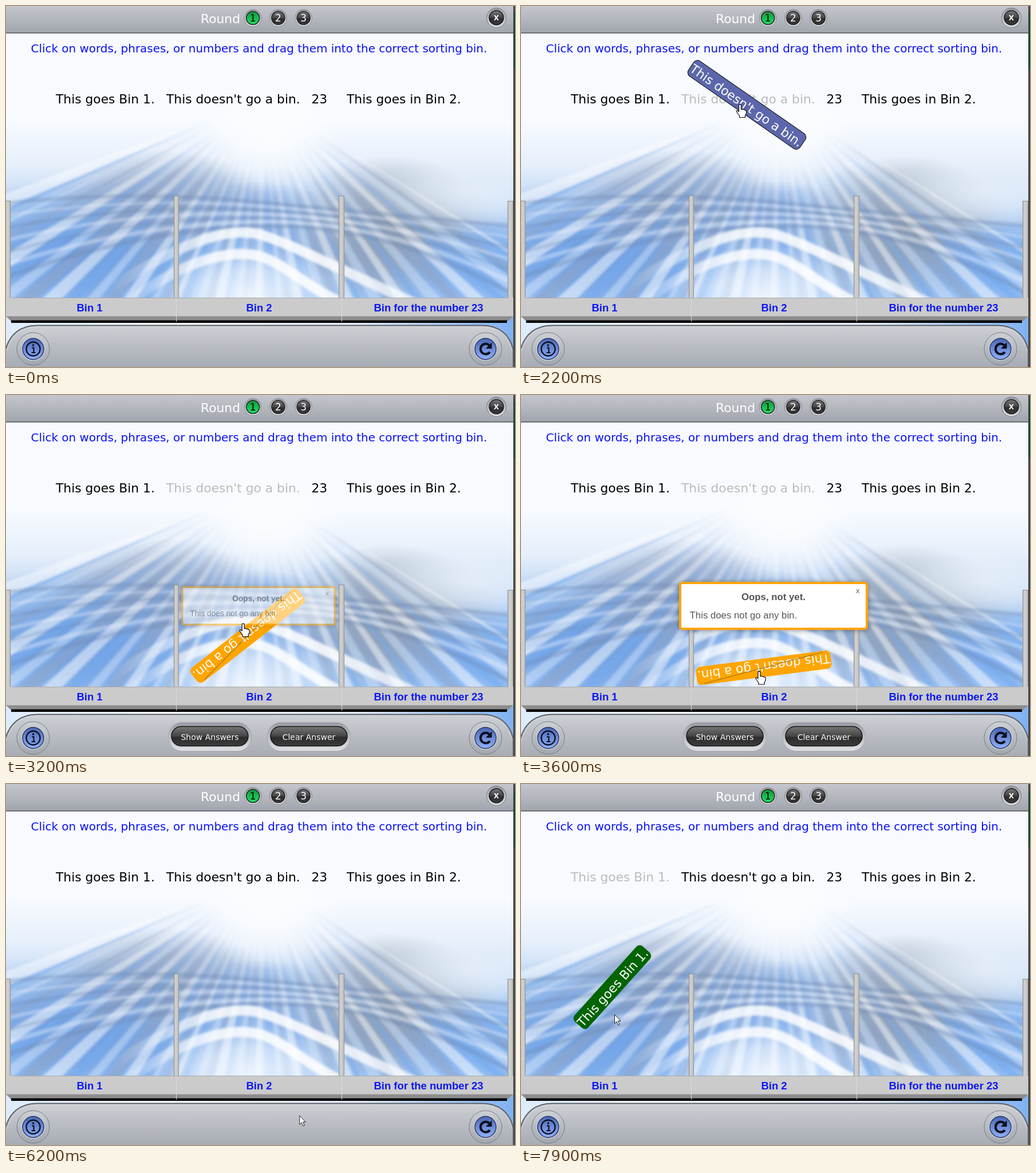
An HTML page with a canvas that plays this animation: 889 px wide and 630 px high, repeating every 8 s.

```html
<!DOCTYPE html>
<html lang="en">
<head>
<meta charset="utf-8">
<title>Sorting bins</title>
<style>
  html, body { margin: 0; width: 100%; height: 100%; overflow: hidden; background: #f8faff; }
  canvas, svg { position: absolute; left: 0; top: 0; width: 889px; height: 630px; }
  text { font-family: "DejaVu Sans", Verdana, sans-serif; white-space: pre; }
  .word { font-size: 21.8px; }
  .label { font: bold 18.5px "Liberation Sans", Arial, sans-serif; fill: #0c18f4; text-anchor: middle; }
  .note { font: 16.8px "Liberation Sans", Arial, sans-serif; fill: #555; }
  .mid { text-anchor: middle; }
</style>
</head>
<body>
<canvas id="bg" width="889" height="630"></canvas>
<svg id="stage" viewBox="0 0 889 630">
  <defs>
    <linearGradient id="bar" x2="0" y2="1">
      <stop offset="0" stop-color="#c3c6cc"/><stop offset=".5" stop-color="#b3b6bd"/><stop offset="1" stop-color="#a0a4ac"/>
    </linearGradient>
    <linearGradient id="panel" x2="0" y2="1">
      <stop offset="0" stop-color="#cdd0d5"/><stop offset=".45" stop-color="#b9bcc3"/><stop offset="1" stop-color="#a3a7af"/>
    </linearGradient>
    <linearGradient id="ring" x2="0" y2="1">
      <stop offset="0" stop-color="#989ba2"/><stop offset="1" stop-color="#dfe1e5"/>
    </linearGradient>
    <linearGradient id="dark" x2="0" y2="1">
      <stop offset="0" stop-color="#777"/><stop offset=".5" stop-color="#444"/><stop offset=".55" stop-color="#2c2c2c"/><stop offset="1" stop-color="#3c3c3c"/>
    </linearGradient>
    <linearGradient id="green" x2="0" y2="1">
      <stop offset="0" stop-color="#0b9a3a"/><stop offset="1" stop-color="#25dc66"/>
    </linearGradient>
    <linearGradient id="blue" x2="0" y2="1">
      <stop offset="0" stop-color="#4a66b4"/><stop offset="1" stop-color="#8fb0fa"/>
    </linearGradient>
    <linearGradient id="wall">
      <stop offset="0" stop-color="#bdbdbd"/><stop offset=".4" stop-color="#d2d2d2"/><stop offset="1" stop-color="#bcbcbc"/>
    </linearGradient>
    <linearGradient id="gap">
      <stop offset="0" stop-color="#dcebfc"/><stop offset=".3" stop-color="#f4f8fd"/><stop offset=".7" stop-color="#e3ebf6"/><stop offset="1" stop-color="#7fb1f1"/>
    </linearGradient>
    <filter id="shade" x="-10%" y="-25%" width="120%" height="150%">
      <feDropShadow dx="0" dy="1" stdDeviation="4" flood-opacity=".4"/>
    </filter>
  </defs>

  <rect x="886" width="3" height="630" fill="#41474b"/>
  <rect x="887" y="12" width="2" height="98" fill="#0c4a2a"/>

  <rect width="886" height="47" fill="url(#bar)"/>
  <rect y="46" width="886" height="2" fill="#6c7078"/>
  <text class="word" x="340" y="29.500" fill="#fff">Round</text>
  <g id="rounds"></g>
  <circle cx="856.500" cy="20.500" r="17" fill="url(#ring)" stroke="#777b82"/>
  <circle cx="856.500" cy="20.500" r="12.500" fill="url(#dark)" stroke="#1c1c1c" stroke-width="1.500"/>
  <text class="mid" x="856.500" y="25" font-size="12" font-weight="bold" fill="#fff">X</text>

  <text x="43.500" y="81" font-size="19.950" fill="#0b12f2">Click on words, phrases, or numbers and drag them into the correct sorting bin.</text>

  <g id="words"></g>

  <g stroke="#929292" fill="url(#wall)">
    <rect x="-.5" y="340.500" width="8" height="170"/>
    <rect x="293.500" y="331.500" width="8" height="178"/>
    <rect x="581.500" y="331.500" width="9" height="178"/>
    <rect x="876.500" y="340.500" width="9" height="170"/>
  </g>
  <rect y="542" width="886" height="88" fill="url(#gap)"/>
  <path d="M0 509H886V542L877 550H9L0 542Z" fill="#cbcbcb"/>
  <path d="M8 509.500H877" stroke="#aaa"/>
  <path d="M0 541.500H886L877 550H9Z" fill="#8d8d8d"/>
  <rect x="9" y="548.500" width="866" height="4.500" fill="#000"/>
  <path d="M297.500 511V551M586.500 511V551" stroke="#dadada"/>
  <text class="label" x="146" y="533">Bin 1</text>
  <text class="label" x="442" y="533">Bin 2</text>
  <text class="label" x="738" y="533">Bin for the number 23</text>

  <path d="M-1 640V600C6 574 24 557.500 54 557.500H832C862 557.500 880 574 886 600V640Z" fill="url(#panel)" stroke="#5c6068" stroke-width="2"/>
  <path d="M1 602C9 577 26 560 55 560H831C860 560 877 577 884 602" fill="none" stroke="#d6d9de"/>
  <g id="knobs"></g>
  <circle cx="47.500" cy="598.500" r="12" fill="none" stroke="#0a0f1c" stroke-width="2.400"/>
  <path d="M45 596.500H48.500V604.500M44.500 605H51.500" fill="none" stroke="#0a0f1c" stroke-width="2.200"/>
  <circle cx="47.500" cy="592" r="1.800" fill="#0a0f1c"/>
  <path d="M845 604A9 9 0 1 1 844 592" fill="none" stroke="#0a0f1c" stroke-width="4"/>
  <path d="M848.500 587V598H838Z" fill="#0a0f1c"/>

  <g id="buttons"></g>
  <g id="pills"></g>

  <g id="popup">
    <rect x="278" y="328" width="326" height="80" rx="4" fill="#fff" stroke="#ffa500" stroke-width="4" filter="url(#shade)"/>
    <text class="note mid" x="441" y="358" style="font-weight:bold">Oops, not yet.</text>
    <text class="note" x="294.600" y="390">This does not go any bin.</text>
    <text class="mid" x="588" y="346" font-size="13" fill="#777">x</text>
  </g>

  <g id="cursor" stroke-linejoin="round">
    <path id="hand" fill="#fff" stroke="#111" stroke-width="1.200" d="M-2 1Q0 -1 2 1V9Q4 7.500 5.500 9.500Q7.500 8.500 8.500 10.500Q10.500 10 11 12V16L9 20V23H-1V20L-6 13Q-6 10 -3.500 11.500L-2 13Z"/>
    <path id="arrow" fill="#fff" stroke="#222" d="M.5 .5V16L4 12.500L6.500 18.500L9 17.500L6.500 11.500H11Z"/>
  </g>
</svg>

<script>
const $ = id => document.getElementById(id);
const show = (el, on) => el.setAttribute('visibility', on ? 'visible' : 'hidden');
const clamp = v => Math.min(1, Math.max(0, v));

// ---------- backdrop ----------
const ctx = $('bg').getContext('2d');
let seed = 7;
const random = () => (seed = seed * 16807 % 2147483647) / 2147483647;

// Soft ellipse fading out to its rim.
function glow(x, y, rx, ry, color) {
  const g = ctx.createRadialGradient(0, 0, 0, 0, 0, 1);
  g.addColorStop(0, color + 'd8');
  g.addColorStop(.5, color + '90');
  g.addColorStop(1, color + '00');
  ctx.save();
  ctx.translate(x, y);
  ctx.scale(rx, ry);
  ctx.fillStyle = g;
  ctx.fillRect(-1, -1, 2, 2);
  ctx.restore();
}

// Wedge of light leaving the vanishing point, angles in degrees.
function ray(angle, spread, color) {
  const x = 450, y = 160, rad = Math.PI / 180;
  const g = ctx.createRadialGradient(x, y, 90, x, y, 600);
  g.addColorStop(0, color + '00');
  g.addColorStop(.3, color + '70');
  g.addColorStop(1, color + '90');
  ctx.fillStyle = g;
  ctx.beginPath();
  ctx.moveTo(x, y);
  for (const a of [angle - spread, angle + spread])
    ctx.lineTo(x + 700 * Math.cos(a * rad), y + 700 * Math.sin(a * rad));
  ctx.fill();
}

function band(path, width, color) {
  ctx.strokeStyle = color;
  ctx.lineWidth = width;
  ctx.stroke(new Path2D(path));
}

function backdrop() {
  const sky = ctx.createLinearGradient(0, 48, 0, 508);
  ['#f8faff', '#f8faff', '#f7faff', '#e6effb', '#b8d3f3', '#93bbee', '#9cc4f6']
    .forEach((c, i) => sky.addColorStop(i / 6, c));
  ctx.fillStyle = sky;
  ctx.fillRect(0, 0, 889, 630);

  glow(130, 425, 240, 130, '#6798dd');
  glow(270, 345, 190, 95, '#8298bd');
  glow(670, 390, 190, 130, '#8f97a4');
  glow(830, 450, 150, 80, '#78abee');
  glow(810, 325, 180, 65, '#e8f0fa');
  glow(440, 365, 130, 60, '#86a8da');

  ctx.filter = 'blur(2px)';
  const tones = ['#ffffff', '#8fa3c4', '#cfe2fa', '#74a9ee'];
  for (let a = 32, i = 0; a < 160; i++) {
    const spread = .3 + 1.1 * random();
    ray(a, spread, tones[i % tones.length]);
    a += spread + 1.2 + 1.6 * random();
  }

  for (let i = 0; i < 7; i++)
    band(`M-10 ${345 + 22 * i}Q220 ${320 + 12 * i} 440 ${342 + 7 * i}T889 ${385 + 20 * i}`,
      3 + 5 * random(), i % 2 ? '#f0f6fe66' : '#6f8ab466');

  const fade = ctx.createLinearGradient(180, 0, 889, 0);
  ['#fff0', '#fffc', '#fffd', '#fffa', '#fff6'].forEach((c, i) => fade.addColorStop(i / 4, c));
  glow(425, 505, 170, 90, '#fafcff');
  for (let i = 0; i < 2; i++) {
    const y = 394 + 38 * i;
    band(`M${130 + 70 * i} 530C300 ${y + 12} 390 ${y - 8} 440 ${y + 4}S${600 - 60 * i} ${y + 75} ${740 - 120 * i} 530`, 18, fade);
  }
  ctx.filter = 'none';
  glow(460, 225, 130, 100, '#fcfdff');
}
backdrop();

// ---------- repeated parts ----------
$('rounds').innerHTML = [1, 2, 3].map(n => {
  const x = 387 + 44.2 * n;
  return `<circle cx="${x}" cy="21" r="15" fill="url(#ring)" stroke="#8a8d94"/>
   <circle cx="${x}" cy="21" r="11.500" fill="url(#${n > 1 ? 'dark' : 'green'})" stroke="#222" stroke-width="1.500"/>
   <text class="mid" x="${x}" y="27" font-size="17" fill="${n > 1 ? '#fff' : '#000'}">${n}</text>`;
}).join('');

$('knobs').innerHTML = [47.5, 837.5].map(x =>
  `<circle cx="${x}" cy="598.500" r="28.500" fill="url(#panel)" stroke="#777b83"/>
   <circle cx="${x}" cy="598.500" r="20.500" fill="#d3d6dc"/>
   <circle cx="${x}" cy="598.500" r="18.500" fill="url(#blue)" stroke="#27345f" stroke-width="1.500"/>`).join('');

$('buttons').innerHTML = [[283, 'Show Answers'], [456, 'Clear Answer']].map(([x, s]) =>
  `<rect x="${x + .5}" y="571.500" width="145" height="50" rx="24" fill="url(#ring)" stroke="#a4a7ad"/>
   <rect x="${x + 6}" y="578.500" width="134" height="34" rx="17" fill="url(#dark)" stroke="#161616" stroke-width="1.500"/>
   <text class="mid" x="${x + 73}" y="602" font-size="14" fill="#fff">${s}</text>`).join('');

const phrases = [[87, 'This goes Bin 1.'], [280, "This doesn't go a bin."], [533.5, '23'], [595, 'This goes in Bin 2.']];
$('words').innerHTML = phrases.map(([x, s]) => `<text class="word" x="${x}" y="169.500">${s}</text>`).join('');
const words = $('words').children;

$('pills').innerHTML = [177, 237].map((w, i) =>
  `<g><rect x="${-w / 2}" y="-16" width="${w}" height="32" rx="8"/>
   <text class="word" x="${1.5 - w / 2}" y="9" fill="#fff">${phrases[i][1]}</text>
   <path d="M${-w / 2 + 12} 14L${w / 2 - 12} -14" stroke="#6b5a3c" stroke-opacity=".7" visibility="hidden"/></g>`).join('');
const pills = $('pills').children;

// ---------- motion: key poses [time, ...values] ----------
const pillPoses = [
  [[7200, 174.5, 160, 0], [7900, 159.5, 354.5, -48]],
  [[1700, 397.5, 160, 0], [2200, 394.5, 172.5, 34.8], [2700, 401, 250.5, 97.2],
   [3200, 422, 420, 142], [3600, 424, 476, 172.6], [3800, 425.5, 491, 180]]
];
const cursorPoses = [
  [800, 440, 516], [1500, 384, 165], [1800, 384, 165], [2200, 382.5, 171.5], [2700, 408, 247],
  [3600, 416, 482], [4000, 416, 489], [4500, 524.5, 593], [6100, 524.5, 593],
  [7000, 169, 165], [7200, 169, 165], [7900, 163, 402]
];

// Smooth curve through the poses that never overshoots them.
function pose(keys, t) {
  const last = keys.length - 1;
  if (t <= keys[0][0]) return keys[0].slice(1);
  if (t >= keys[last][0]) return keys[last].slice(1);
  const i = keys.findIndex(k => k[0] > t) - 1;
  const slope = (n, j) => n < 0 || n >= last ? 0 : (keys[n + 1][j] - keys[n][j]) / (keys[n + 1][0] - keys[n][0]);
  const tangent = (n, j) => {
    const a = slope(n - 1, j), b = slope(n, j);
    return a * b > 0 ? 2 * a * b / (a + b) : 0;
  };
  const span = keys[i + 1][0] - keys[i][0], u = (t - keys[i][0]) / span, v = 1 - u;
  return keys[i].slice(1).map((from, n) => {
    const j = n + 1;
    return from * v * v * (1 + 2 * u) + keys[i + 1][j] * u * u * (3 - 2 * u) +
      span * u * v * (tangent(i, j) * v - tangent(i + 1, j) * u);
  });
}
const within = (t, from, to) => t >= from && t < to;
const easeOutBack = u => 1 + 2.7 * (u - 1) ** 3 + 1.7 * (u - 1) ** 2;

function setPill(i, t, from, to, dropped, color) {
  const on = within(t, from, to), loose = t < dropped;
  const [x, y, turn] = pose(pillPoses[i], t);
  const [box, , strike] = pills[i].children;
  show(pills[i], on);
  show(strike, on && !loose && i === 1);
  pills[i].setAttribute('transform', `translate(${x} ${y}) rotate(${turn})`);
  box.setAttribute('fill', loose ? '#5c67ab' : color);
  box.setAttribute('stroke', loose ? '#000' : 'none');
  words[i].setAttribute('fill', on ? '#bcbcbc' : '#000');
}

function draw(t) {
  setPill(0, t, 7000, 8000, 7900, '#006400');
  setPill(1, t, 1500, 5200, 3200, '#ffa500');

  const grow = clamp((t - 3100) / 400), leave = clamp((t - 5000) / 500);
  $('popup').setAttribute('transform', `translate(441 368) scale(${easeOutBack(grow)}) translate(-441 -368)`);
  $('popup').setAttribute('opacity', clamp(2 * grow) * (1 - leave ** 2));
  show($('buttons'), within(t, 3200, 5200));

  const [x, y] = pose(cursorPoses, t);
  const hand = within(t, 1500, 4100) || within(t, 4300, 5200) || within(t, 7000, 7900);
  $('cursor').setAttribute('transform', `translate(${x} ${y})`);
  show($('hand'), hand);
  show($('arrow'), t >= 800 && !hand);
}

// The picture steps ten times a second.
const start = performance.now();
function tick() {
  const t = (performance.now() - start) % 8000;
  draw(Math.floor(t / 100) * 100);
  requestAnimationFrame(tick);
}
tick();
</script>
</body>
</html>
```
